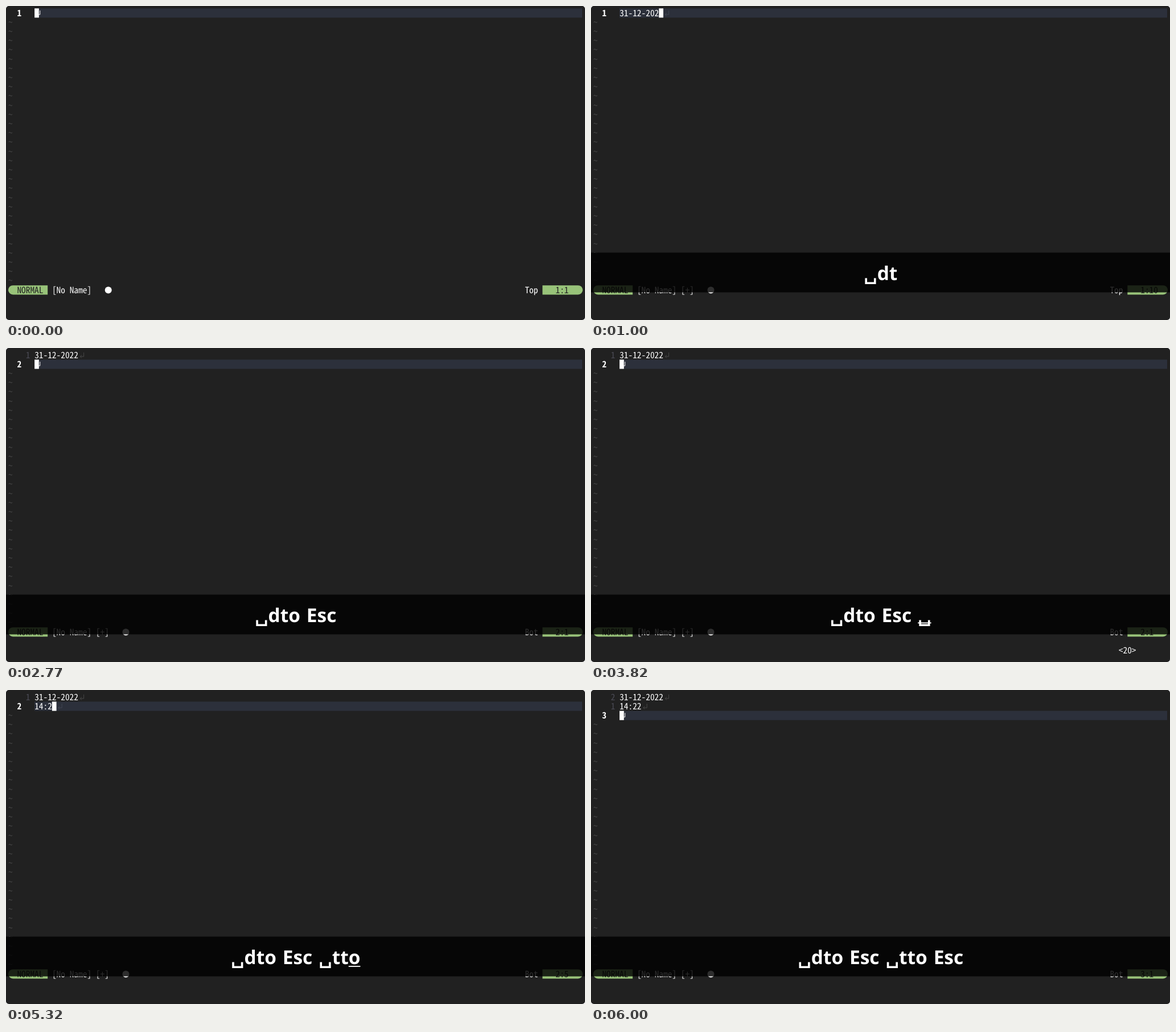
These frames come from a looping animation (1017x551 px, 6.1 s). An HTML page:

```html
<!DOCTYPE html>
<html lang="en">
<head>
<meta charset="utf-8">
<title>Editor date and time shortcuts</title>
<style>
  html, body { margin: 0; width: 100%; height: 100%; overflow: hidden; background: #fff; }
  svg { display: block; width: 1017px; height: 551px; }
  text { white-space: pre; text-rendering: geometricPrecision; }
  .mono { font-family: "Noto Sans Mono CJK JP", "Noto Sans Mono", "DejaVu Sans Mono", monospace; fill: #fff; }
  .keys { font: bold 33.4px "Noto Sans", "Open Sans", sans-serif; fill: #fff; }
</style>
</head>
<body>
<svg id="stage" viewBox="0 0 1017 551"></svg>
<script>
const LOOP = 6100, COL = 7.69, ROW = 16.2, LEFT = 4, TOP = 4.2;
const BG = '#212121', GREEN = '#98c379', BLUE = '#61afef';
const SPACE = '␣', SPACE_WIDTH = 23.5, GAP = 11;

const stage = document.getElementById('stage');
const pen = document.createElement('canvas').getContext('2d');

function measure(font, text) {
  pen.font = font;
  return pen.measureText(text).width;
}

// Font size whose character advance equals one grid column.
const monoSize = COL * 1000 /
  measure('100px "Noto Sans Mono CJK JP", "Noto Sans Mono", "DejaVu Sans Mono", monospace', '0000000000');

const DATE = '31-12-2022', CLOCK = '14:22';

// Each entry changes part of the screen from the given time on.
const timeline = [
  [0, { lines: [''], column: 0, insert: false, changed: false, keys: [], fresh: false, pending: '' }],
  [140, { keys: [SPACE], fresh: true, pending: '<20>' }],
  [270, { keys: [SPACE, 'd'] }],
  [320, { pending: '<20>d' }],
  [410, { keys: [SPACE, 'd', 't'] }],
  [460, { lines: [DATE], column: 9, changed: true, pending: '' }],
  [550, { fresh: false }],
  [1270, { keys: [SPACE, 'd', 't', 'o'], fresh: true }],
  [1320, { lines: [DATE, ''], column: 0, insert: true }],
  [1410, { keys: [SPACE, 'd', 't', 'o', ' ', 'Esc'] }],
  [1500, { insert: false }],
  [1600, { fresh: false }],
  [3820, { keys: [SPACE, 'd', 't', 'o', ' ', 'Esc', ' ', SPACE], fresh: true, pending: '<20>' }],
  [3950, { keys: [SPACE, 'd', 't', 'o', ' ', 'Esc', ' ', SPACE, 't'] }],
  [4000, { pending: '<20>t' }],
  [4140, { keys: [SPACE, 'd', 't', 'o', ' ', 'Esc', ' ', SPACE, 't', 't'] }],
  [4190, { lines: [DATE, CLOCK], column: 4, pending: '' }],
  [4320, { fresh: false }],
  [5180, { keys: [SPACE, 'd', 't', 'o', ' ', 'Esc', ' ', SPACE, 't', 't', 'o'], fresh: true }],
  [5360, { lines: [DATE, CLOCK, ''], column: 0, insert: true }],
  [5500, { keys: [SPACE, 'd', 't', 'o', ' ', 'Esc', ' ', SPACE, 't', 't', 'o', ' ', 'Esc'] }],
  [5590, { insert: false }],
  [5730, { fresh: false }]
];

const states = [];
timeline.reduce((before, [time, change]) => {
  const state = { ...before, ...change };
  states.push({ time, state });
  return state;
}, {});

const x = col => LEFT + col * COL;
const y = row => TOP + row * ROW;
const escapeText = s => s.replace(/</g, '&lt;').replace(/>/g, '&gt;');

const rect = (left, top, width, height, fill) =>
  `<rect x="${left}" y="${top}" width="${width}" height="${height}" fill="${fill}"/>`;

const mono = (col, row, s, fill = '#fff', weight = 400) =>
  `<text class="mono" x="${x(col)}" y="${y(row) + 13.4}" font-size="${monoSize}" ` +
  `font-weight="${weight}" fill="${fill}" style="fill:${fill}">${escapeText(s)}</text>`;

const lineEnd = (col, row, color) =>
  `<path d="M${x(col) + 9.6} ${y(row) + 3.6}v7.2h-6.4m2.6 -2.4l-2.6 2.4l2.6 2.4" fill="none" stroke="${color}"/>`;

function drawBuffer({ lines, column, insert }) {
  const current = lines.length - 1;
  let out = rect(50, y(current), 962, ROW, '#2c303b');
  lines.forEach((line, row) => {
    const active = row === current;
    out += active ? mono(2, row, String(row + 1), '#fff', 700)
                  : mono(4, row, String(current - row), '#4b4b55');
    out += mono(6, row, line);
    const underCursor = active && !insert && line === '';
    out += lineEnd(6 + line.length, row, underCursor ? '#fff' : active ? '#404653' : '#484848');
  });
  for (let row = lines.length; row < 30; row++) out += mono(0, row, '~', '#484848');
  return out + rect(x(6 + column), y(current), insert ? 1.2 : COL, ROW, '#fff');
}

function drawStatus({ lines, column, insert, changed, pending }) {
  const accent = insert ? BLUE : GREEN;
  const top = y(30);
  return `<path d="M73.2 ${top}H12.1a8.1 8.1 0 0 0 0 16.2H73.2z" fill="${accent}"/>` +
    `<path d="M942.3 ${top}H1004.9a8.1 8.1 0 0 1 0 16.2H942.3z" fill="${accent}"/>` +
    mono(2, 30, insert ? 'INSERT' : 'NORMAL', BG) +
    mono(10, 30, changed ? '[No Name] [+]' : '[No Name]') +
    `<circle cx="${changed ? 210.5 : 179.7}" cy="498.5" r="6" fill="#fff"/>` +
    mono(118, 30, lines.length > 1 ? 'Bot' : 'Top') +
    mono(125, 30, `${lines.length}:${column + 1}`, BG) +
    mono(120, 32, pending);
}

function keyWidth(key) {
  if (key === SPACE) return SPACE_WIDTH;
  if (key === ' ') return GAP;
  return measure('bold 33.4px "Noto Sans", "Open Sans", sans-serif', key);
}

function drawKeys({ keys, fresh }) {
  if (!keys.length) return '';
  const widths = keys.map(keyWidth);
  let left = 508.7 - widths.reduce((a, b) => a + b) / 2;
  let out = rect(0, 432.7, 1017, 69.8, 'rgba(0,0,0,.82)');
  keys.forEach((key, i) => {
    if (key === SPACE) {
      out += `<path d="M${left + 4} 477.5v8.7h15.6v-8.7" fill="none" stroke="#fff" stroke-width="3.6"/>`;
    } else if (key !== ' ') {
      out += `<text class="keys" x="${left}" y="481">${key}</text>`;
    }
    if (fresh && i === keys.length - 1) {
      out += rect(left, key === SPACE ? 481.5 : 484, widths[i], 1.8, '#fff');
    }
    left += widths[i];
  });
  return out;
}

let shown;
function frame() {
  const now = performance.now() % LOOP;
  const { state } = states.findLast(s => s.time <= now);
  if (state !== shown) {
    shown = state;
    stage.innerHTML = `<rect width="1017" height="551" rx="5" fill="${BG}"/>` +
      drawBuffer(state) + drawStatus(state) + drawKeys(state);
  }
  requestAnimationFrame(frame);
}
frame();
</script>
</body>
</html>
```
